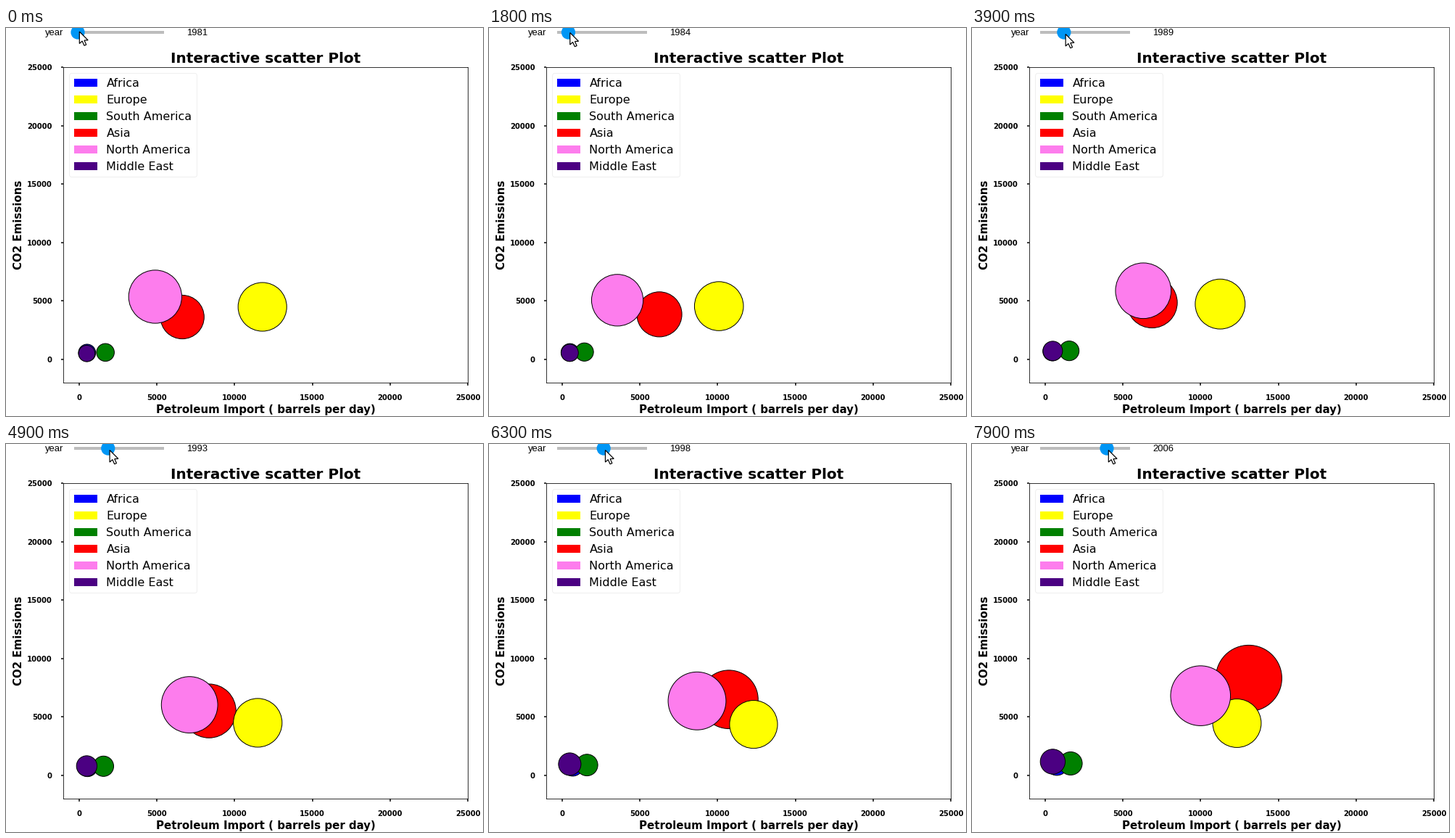
A matplotlib script that plays this animation: 658 by 535 pixels, repeating every 8000 ms.

```python
import numpy as np
import matplotlib.pyplot as plt
from matplotlib.animation import FuncAnimation
from matplotlib.patches import Circle, Patch, Polygon, Rectangle

W, H, DPI = 658, 535, 72
FRAMES, STEP = 80, 100
FIRST = 1981

COLORS = {"Africa": "#0000ff", "Europe": "#ffff00", "South America": "#008000",
          "Asia": "#ff0000", "North America": "#fd7ded", "Middle East": "#4b0082"}

# Turning points, in years since the first, of imports and emissions.
# Regions are listed from the back of the plot to the front.
TRENDS = {
    "Africa": ({0: 520, 8: 480, 20: 760}, {0: 565, 25: 970}),
    "Asia": ({0: 6640, 5: 5690, 8: 6880, 14: 9840, 25: 13100},
             {0: 3630, 5: 4200, 14: 6180, 20: 6830, 25: 8320}),
    "Europe": ({0: 11790, 2: 10090, 5: 9950, 8: 11260, 14: 11720, 20: 12910, 25: 12340},
               {0: 4500, 8: 4740, 14: 4270, 20: 4470}),
    "South America": ({0: 1700, 5: 1050, 8: 1560, 25: 1650}, {0: 600, 25: 1025}),
    "North America": ({0: 4900, 2: 3560, 5: 3470, 8: 6320, 20: 9470, 25: 10000},
                      {0: 5370, 2: 5070, 8: 5880, 25: 6820}),
    "Middle East": ({0: 500}, {0: 510, 25: 1180}),
}

# Pace of the drag: step -> years since the first
DRAG = {0: 0, 18: 3, 30: 6, 40: 9, 58: 15, 70: 21, 78: 25}

ARROW = np.array([(0, 0), (0, 16.5), (3.8, 13), (6.6, 19.2), (9.4, 18),
                  (6.7, 12), (11.8, 11.8)])


def along(points, t):
    return np.interp(t, list(points), list(points.values()))


def years_passed(i):
    return int(along(DRAG, i) + 1e-6)


def bubbles(t):
    return np.array([[along(p, t) for p in pair] for pair in TRENDS.values()])


fig = plt.figure(figsize=(W / DPI, H / DPI), dpi=DPI, facecolor="white")

ax = fig.add_axes([79.2 / W, 1 - 489.2 / H, 558 / W, 434.88 / H])
ticks = range(0, 25001, 5000)
ax.set(xticks=ticks, yticks=ticks, xlim=(-1000, 25000), ylim=(-2000, 25000))
ax.tick_params(labelsize=10, pad=12, length=3.5, width=1.5)
for label in ax.get_xticklabels() + ax.get_yticklabels():
    label.set_fontweight("bold")
ax.set_title("Interactive scatter Plot", fontsize=20, fontweight="bold")
ax.set_xlabel("Petroleum Import ( barrels per day)", fontsize=15, fontweight="bold")
ax.set_ylabel("CO2 Emissions", fontsize=15, fontweight="bold")
ax.legend(handles=[Patch(color=c, label=r, lw=0) for r, c in COLORS.items()],
          loc="upper left", fontsize=16, edgecolor="0.92")
scatter = ax.scatter(*bubbles(0).T, c=[COLORS[r] for r in TRENDS],
                     edgecolors="black", linewidths=1, zorder=3)

# Slider and pointer, in pixel coordinates
ui = fig.add_axes([0, 0, 1, 1], zorder=5)
ui.set(xlim=(0, W), ylim=(H, 0))
ui.axis("off")
sans = dict(family="Liberation Sans", fontsize=13, va="baseline")
ui.text(54, 10, "year", **sans)
readout = ui.text(249, 10, "", **sans)
ui.add_patch(Rectangle((94, 4), 124, 4, color="#bdbdbd", lw=0))
knob = ui.add_patch(Circle((99, 6), 9.6, color="#0096f5", lw=0, zorder=3))
pointer = ui.add_patch(Polygon(ARROW, fc="white", ec="black", lw=1.2, zorder=4))


def update(i):
    t = years_passed(i)
    x = 99 + 3.48 * t
    readout.set_text(str(FIRST + t))
    knob.center = (x, 6)
    pointer.set_xy(ARROW + (x + 2.3, min(5 + t / 2, 8.5)))

    # The plot answers one step after the slider; area follows emissions
    data = bubbles(years_passed(i - 1))
    scatter.set_offsets(data)
    scatter.set_sizes(data[:, 1])
    return readout, knob, pointer, scatter


anim = FuncAnimation(fig, update, frames=FRAMES, interval=STEP,
                     repeat=True, repeat_delay=0, blit=False)
plt.show()
```
